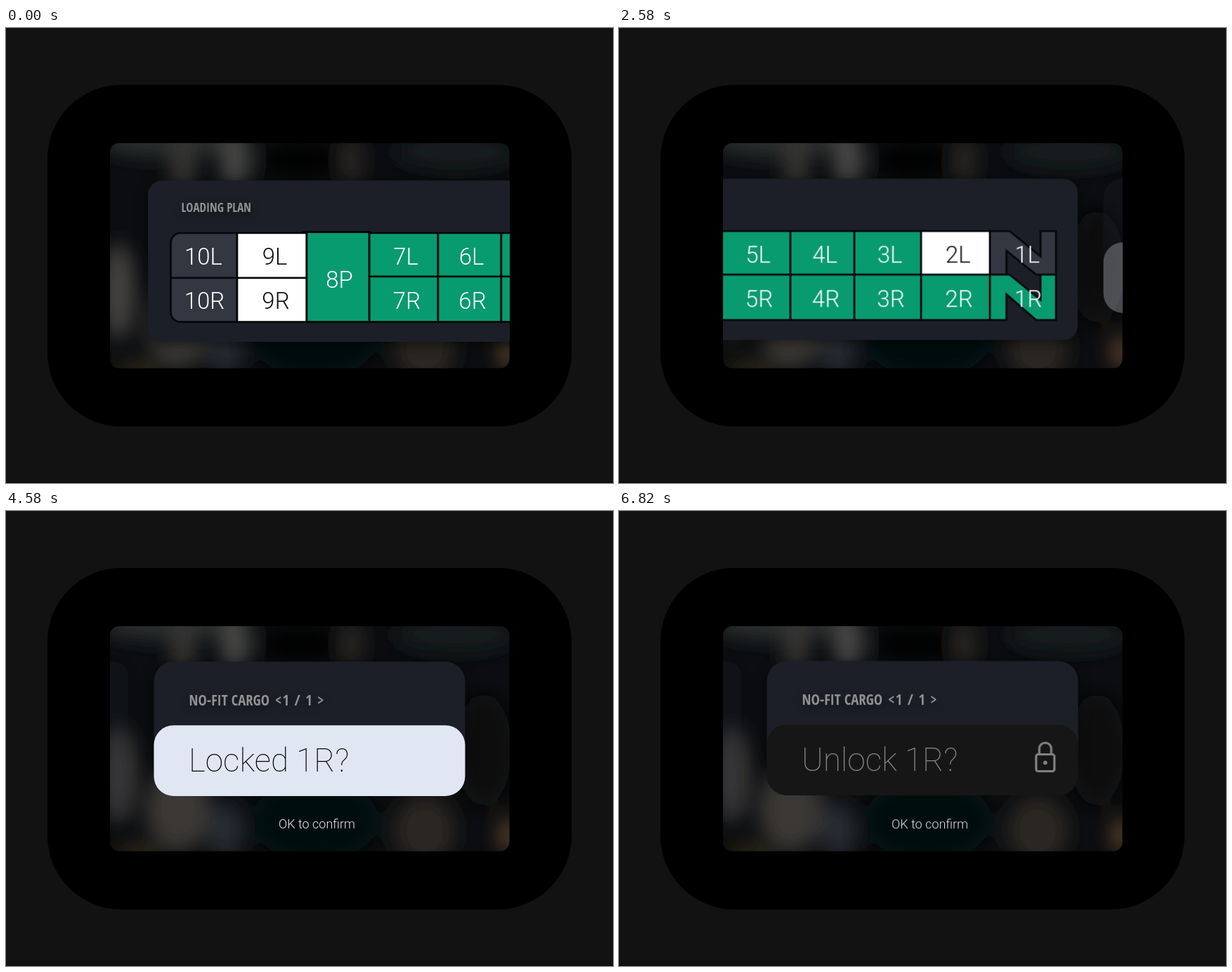
Recreate the animation shown at these times as an HTML page. Size 864 by 648 pixels, loop 7900 ms.

```html
<!DOCTYPE html>
<html lang="en">
<head>
<meta charset="utf-8">
<title>Loading plan</title>
<style>
html, body { margin: 0; width: 100%; height: 100%; overflow: hidden; background: #121212; }
svg { display: block; width: 864px; height: 648px; }
text { font-family: Roboto, Inter, sans-serif; font-weight: 300; fill: #fff; }
.head {
  font-family: 'Open Sans Condensed', 'Open Sans', 'Roboto Condensed', sans-serif;
  font-stretch: 75%; font-weight: 400; fill: #929292;
  filter: drop-shadow(0 4px 6px #0007);
}
.cell { stroke: #050608; stroke-width: 2.7; }
.label { font-size: 33px; text-anchor: middle; }
.big { font-size: 46px; font-weight: 200; }
.panel { fill: #1c1f28; }
.shade { filter: drop-shadow(0 4px 9px #0008); }

/* every move is a 360 ms ease inside the 7900 ms loop */
#track, #plan, #cargo, #box, #locked, #unlock, #lock, #ok { animation: 7900ms ease infinite; }
#track { animation-name: track; }
#plan { animation-name: plan; }
#cargo { animation-name: cargo; }
#box { animation-name: box; }
#locked { animation-name: locked; }
#unlock { animation-name: unlock; }
#lock { animation-name: lock; }
#ok { animation-name: ok; }

@keyframes track {
  0%, 28.1013% { transform: translate(0, 0); }
  32.6582%, 51.3924% { transform: translate(-558.5px, -2.7px); }
  55.9494%, 72.1519% { transform: translate(-1037.5px, -2.7px); }
  76.7089%, 100% { transform: translate(-1037.5px, -3.6px); }
}
@keyframes plan {
  0%, 51.3924% { opacity: 1; animation-timing-function: ease-in-out; }
  55.9494%, 100% { opacity: .3; }
}
@keyframes cargo {
  0%, 51.3924% { opacity: .3; }
  55.9494%, 100% { opacity: 1; }
}
@keyframes box {
  0%, 78.2278% { fill: #e1e6f3; }
  82.7848%, 100% { fill: #161616; }
}
@keyframes locked {
  0%, 72.1519% { fill: #000; opacity: 1; }
  76.7089%, 82.2785% { fill: #959595; opacity: 1; }
  86.8354%, 100% { fill: #959595; opacity: 0; }
}
@keyframes unlock {
  0%, 82.2785% { opacity: 0; }
  86.8354%, 100% { opacity: 1; }
}
@keyframes lock {
  0%, 82.2785% { opacity: 0; transform: translateX(32px); }
  86.8354%, 100% { opacity: 1; transform: none; }
}
@keyframes ok {
  0%, 53.4177% { opacity: 0; transform: translateY(30px); }
  57.9747%, 72.1519% { opacity: 1; transform: translateY(0); }
  76.7089%, 82.2785% { opacity: 0; transform: translateY(30px); }
  86.8354%, 100% { opacity: 1; transform: translateY(0); }
}
</style>
</head>
<body>
<svg viewBox="0 0 864 648">
  <defs>
    <clipPath id="screen"><rect x="148" y="164" width="568.5" height="320.5" rx="13"/></clipPath>
    <filter id="blur" x="-20%" y="-20%" width="140%" height="140%"><feGaussianBlur stdDeviation="14"/></filter>
  </defs>
  <rect width="864" height="648" fill="#121212"/>
  <rect y="647" width="864" height="1" fill="#0a070a"/>
  <rect x="59" y="81" width="746" height="486.5" rx="105"/>
  <g clip-path="url(#screen)">
    <rect x="148" y="164" width="569" height="321" fill="#0b0d10"/>
    <g id="photo" filter="url(#blur)"></g>
    <g id="track">
      <g id="plan">
        <rect class="panel shade" x="202" y="217.3" width="1009.5" height="229.7" rx="20"/>
        <text class="head" x="249.5" y="262.3" font-size="17">LOADING PLAN</text>
        <g id="cells"></g>
      </g>
      <g id="cargo" transform="translate(1037.5 2.7)">
        <path class="panel shade" d="M210.5 360V242.5a28 28 0 0 1 28-28H625.5a28 28 0 0 1 28 28V360z"/>
        <text class="head" x="260.5" y="276.5" font-size="20.6">NO-FIT CARGO</text>
        <text class="head" x="383" y="276.5" font-size="20.6" letter-spacing="1.2">&lt;1 / 1 &gt;</text>
        <rect id="box" x="210.5" y="305.2" width="443" height="100.8" rx="28"/>
        <text id="locked" class="big" x="260" y="370.5">Locked 1R?</text>
        <text id="unlock" class="big" x="260" y="370.5" style="fill:#959595">Unlock 1R?</text>
        <g id="lock" fill="none" stroke="#858585" stroke-width="3.2">
          <rect x="593.5" y="347.5" width="26" height="24" rx="3"/>
          <path d="M598 347.5V339.5a8.5 8.5 0 0 1 17 0V347.5"/>
          <circle cx="606.5" cy="359.3" r="2.9" fill="#858585" stroke="none"/>
        </g>
      </g>
    </g>
    <text id="ok" x="442.5" y="452" font-size="18" text-anchor="middle" style="fill:#e6e6e6">OK to confirm</text>
  </g>
</svg>
<script>
const GREEN = '#089b6f', GREY = '#343742', WHITE = '#fff';

function add(parent, tag, attrs, content = '') {
  const el = document.createElementNS('http://www.w3.org/2000/svg', tag);
  for (const key in attrs) el.setAttribute(key, attrs[key]);
  el.textContent = content;
  document.getElementById(parent).append(el);
}

// blurred backdrop: cx, cy, rx, ry, colour
[
  [230, 160, 100, 24, '#2b2e2e'], [252, 196, 16, 44, '#3a3836'],
  [326, 186, 20, 46, '#4a4846'], [418, 188, 58, 22, '#030406'],
  [492, 190, 16, 40, '#2a2523'], [640, 176, 90, 26, '#191b1c'],
  [160, 375, 24, 68, '#45423f'], [245, 425, 46, 60, '#3a3836'],
  [312, 455, 26, 40, '#252b31'], [440, 440, 90, 60, '#03080d'],
  [190, 488, 34, 12, '#362a18'], [596, 455, 44, 50, '#2c2521'],
  [716, 462, 16, 24, '#58402a'], [680, 340, 40, 80, '#080b0f']
].forEach(([cx, cy, rx, ry, fill]) => add('photo', 'ellipse', { cx, cy, rx, ry, fill }));

const edges = [234.5, 329, 428, 517, 615, 705, 802.5, 893.5, 988.5, 1086.5, 1180.5];
const centres = [281, 382.5, 474.5, 569, 662.5, 756.5, 851.5, 944, 1041, 1139.5];
const gridTop = 292, gridEnd = 418.7;

const label = (text, x, y, fill) => add('cells', 'text', { class: 'label', x, y, style: `fill:${fill}` }, text);
const cell = (d, fill) => add('cells', 'path', { class: 'cell', d, fill });
const block = (x0, x1, y0, y1) => `M${x0} ${y0}H${x1}V${y1}H${x0}z`;
const notched = (x0, x1, y0, y1) =>
  `M${x0} ${y0}H${x0 + 28}L${x1 - 22} ${y0 + 36}V${y0}H${x1}V${y1}H${x1 - 28}L${x0 + 23.5} ${y0 + 28}V${y1}H${x0}z`;

centres.forEach((cx, i) => {
  const num = 10 - i, x0 = edges[i], x1 = edges[i + 1];
  if (num === 8) return;
  const mid = num > 8 ? 356 : 354;
  let upper = block(x0, x1, gridTop, mid), lower = block(x0, x1, mid, gridEnd);
  if (num === 10) {
    upper = `M${x1} ${gridTop}H${x0 + 14}a14 14 0 0 0 -14 14V${mid}H${x1}z`;
    lower = `M${x1} ${gridEnd}H${x0 + 14}a14 14 0 0 1 -14 -14V${mid}H${x1}z`;
  }
  if (num === 1) {
    upper = notched(x0, x1, gridTop, mid);
    lower = notched(x0, x1, mid, gridEnd);
  }
  const fillL = num === 10 || num === 1 ? GREY : num === 9 || num === 2 ? WHITE : GREEN;
  const fillR = num === 10 ? GREY : num === 9 ? WHITE : GREEN;
  cell(upper, fillL);
  cell(lower, fillR);
  label(num + 'L', cx, 337.3, fillL === WHITE ? '#111' : '#fff');
  label(num + 'R', cx + 1.5, 400.3, fillR === WHITE ? '#111' : '#fff');
});

// the full-height position sits slightly above its row
cell('M421 290.7H520', 'none');
cell(block(428, 517, 290.7, gridEnd), GREEN);
label('8P', 474.5, 369.8, '#fff');
</script>
</body>
</html>
```
